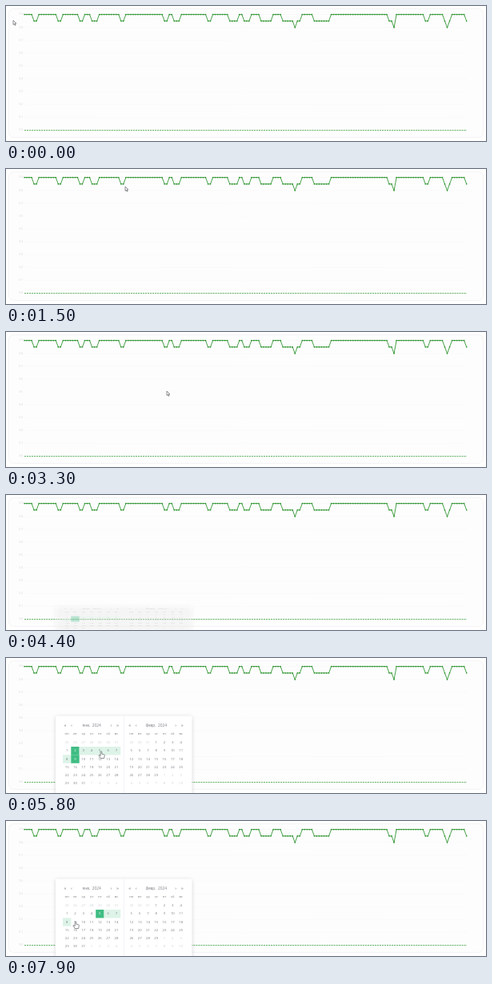
Animation of 600 by 169 pixels, one loop 8 s. Source, as an HTML page with a canvas:

```html
<!DOCTYPE html>
<html lang="ru">
<head>
<meta charset="utf-8">
<style>
  html, body { margin: 0; width: 100%; height: 100%; overflow: hidden; background: #fff; }
  canvas { display: block; width: 600px; height: 169px; }
</style>
</head>
<body>
<canvas id="stage"></canvas>
<script>
const canvas = document.getElementById('stage');
const ctx = canvas.getContext('2d');
const ratio = window.devicePixelRatio || 1;
canvas.width = 600 * ratio;
canvas.height = 169 * ratio;

const LOOP = 8000, STEP = 100, MOVE = 700;
const GREEN = '#259025', ACCENT = '#3fbd83', RANGE = '#ddf3e8';
const INK = '#7b7e84', PALE = '#cdd0d6';
const FONT = '"Open Sans", sans-serif';
const CELL = 10.3, GRID_TOP = 100.7, LEFT = 71;

const clamp = v => Math.min(1, Math.max(0, v));
const bell = (v, center, spread) => Math.exp(-(((v - center) / spread) ** 2));

// Dips in the chart; they are widest around sample 114.
const dips = [4.5, 14.5, 23.5, 29, 40.5, 58.5, 63, 76.5, 86.5, 92, 100, 110.5, 123, 152, 166.5, 175, 184];
const spikes = [112, 153, 175];
const isLow = i => dips.some(c => Math.abs(i - c) <= 1 + 3.1 * bell(c, 114, 20.5));
const series = Array.from({ length: 184 }, (_, i) => {
  const level = spikes.includes(i) ? 2 : isLow(i) ? 1 : 0;
  return [23 + i * 3.02, 10.6 + level * 8.2];
});

// Pointer moves: start time and destination; every move takes MOVE ms.
const moves = [
  [0, -3, -30], [700, 149, 22], [1500, 295, 27], [2600, 201, 74],
  [3300, 148, 220], [4300, 138, 156], [5100, 119, 117], [7200, 87, 126]
];

function pointerAt(t) {
  let x = 9, y = 18;
  for (const [start, toX, toY] of moves) {
    const k = clamp((t - start) / MOVE);
    x += (toX - x) * k;
    y += (toY - y) * k;
  }
  const detour = Math.sin(Math.PI * clamp((t - 6300) / MOVE));
  return [x + 21 * detour, y + 8 * detour];
}

function text(str, x, y, size, color, align = 'center') {
  ctx.font = `${size}px ${FONT}`;
  ctx.fillStyle = color;
  ctx.textAlign = align;
  ctx.textBaseline = 'middle';
  ctx.fillText(str, x, y);
}

function polyline(points, color, width) {
  ctx.beginPath();
  points.forEach(([x, y]) => ctx.lineTo(x, y));
  ctx.strokeStyle = color;
  ctx.lineWidth = width;
  ctx.stroke();
}

function drawChart() {
  ctx.fillStyle = '#fff';
  ctx.fillRect(0, 0, 600, 169);
  ctx.beginPath();
  ctx.roundRect(3.5, 3.5, 593, 161, 6);
  ctx.fillStyle = '#fdfdfe';
  ctx.fill();
  ctx.strokeStyle = '#f4f4f6';
  ctx.lineWidth = 1;
  ctx.stroke();

  for (let i = 0; i < 10; i++) {
    const y = 10.6 + i * 16.1;
    polyline([[23, y], [576, y]], '#f9f9fa', 0.7);
    text(((9 - i) / 10).toFixed(1), 21, y, 3.2, '#d0d0d4', 'right');
  }

  polyline(series, GREEN, 0.85);
  ctx.fillStyle = GREEN;
  for (const [x, y] of series) ctx.fillRect(x - 0.7, y - 0.7, 1.4, 1.4);

  ctx.setLineDash([2, 1.02]);
  polyline([[23, 155.6], [576, 155.6]], '#4aa44a', 0.9);
  ctx.setLineDash([]);
}

function dayFill(day, t, hovered) {
  const [first, last] = t < 6100 ? [2, 9] : [5, hovered];
  if (day === first || (t < 6100 && day === last)) return ACCENT;
  return day > first && day < last ? RANGE : null;
}

// Draws six weeks; `lead` is how many days of the previous month come first.
function drawMonth(month, x, lead, length, fillOf) {
  text(`${month}  2024`, x + 3.5 * CELL, 85, 4.8, INK);
  ['«', '‹', '›', '»'].forEach((sign, i) =>
    text(sign, x + 3 + i * 8 + (i > 1 ? 41.5 : 0), 84.4, 6, INK));
  ['пн', 'вт', 'ср', 'чт', 'пт', 'сб', 'вс'].forEach((name, i) =>
    text(name, x + (i + 0.5) * CELL, 95.4, 4.2, INK));

  for (let i = 0; i < 42; i++) {
    const day = i - lead + 1;
    const inside = day >= 1 && day <= length;
    const cx = x + (i % 7) * CELL;
    const cy = GRID_TOP + Math.floor(i / 7) * CELL;
    const fill = inside && fillOf(day);
    if (fill) {
      ctx.fillStyle = fill;
      ctx.fillRect(cx, cy, CELL + 0.1, CELL + 0.1);
    }
    const label = day < 1 ? day + 31 : inside ? day : day - length;
    const color = fill === ACCENT ? '#fff' : inside ? INK : PALE;
    text(label, cx + CELL / 2, cy + CELL / 2, 4.3, color);
  }
}

function drawCalendar(t, x, y) {
  const open = clamp((t - 4300) / 300);
  if (!open) return;
  const column = Math.floor((x - LEFT) / CELL);
  const week = Math.floor((y - GRID_TOP) / CELL) - 1;
  const hovered = week * 7 + column + 1;

  ctx.save();
  ctx.globalAlpha = open;
  ctx.translate(0, 172 * (1 - open));
  ctx.scale(1, open);
  ctx.save();
  ctx.shadowColor = 'rgba(0,0,0,.16)';
  ctx.shadowBlur = 5 * ratio;
  ctx.shadowOffsetY = ratio;
  ctx.fillStyle = '#fff';
  ctx.beginPath();
  ctx.roundRect(62, 72.5, 170.5, 105, 1.5);
  ctx.fill();
  ctx.restore();
  polyline([[147.3, 73], [147.3, 177]], '#eceef2', 0.7);
  drawMonth('янв.', LEFT, 7, 31, day => dayFill(day, t, hovered));
  drawMonth('февр.', 151.7, 3, 29, () => null);
  ctx.restore();
}

const arrow = new Path2D('M0 0V5.4L1.3 4.3L2.2 6.3L3.1 5.9L2.2 3.9H3.9Z');
const hand = new Path2D('M-.8 .3Q0-.7 .8 .3V3.2L3.6 3.8Q4.4 4 4.3 5L3.6 8.6H-.8L-3 5.2Q-3.1 4.2-2 4.5L-.8 5.6Z');

function drawPointer(t, x, y) {
  const shape = t < 4300 ? arrow : hand;
  ctx.save();
  ctx.translate(x, y);
  ctx.fillStyle = '#fff';
  ctx.fill(shape);
  ctx.strokeStyle = '#5c6064';
  ctx.lineWidth = 0.7;
  ctx.stroke(shape);
  ctx.restore();
}

function frame() {
  const t = Math.floor((performance.now() % LOOP) / STEP) * STEP;
  const [x, y] = pointerAt(t);
  ctx.setTransform(ratio, 0, 0, ratio, 0, 0);
  drawChart();
  drawCalendar(t, x, y);
  drawPointer(t, x, y);
  requestAnimationFrame(frame);
}
frame();
</script>
</body>
</html>
```
